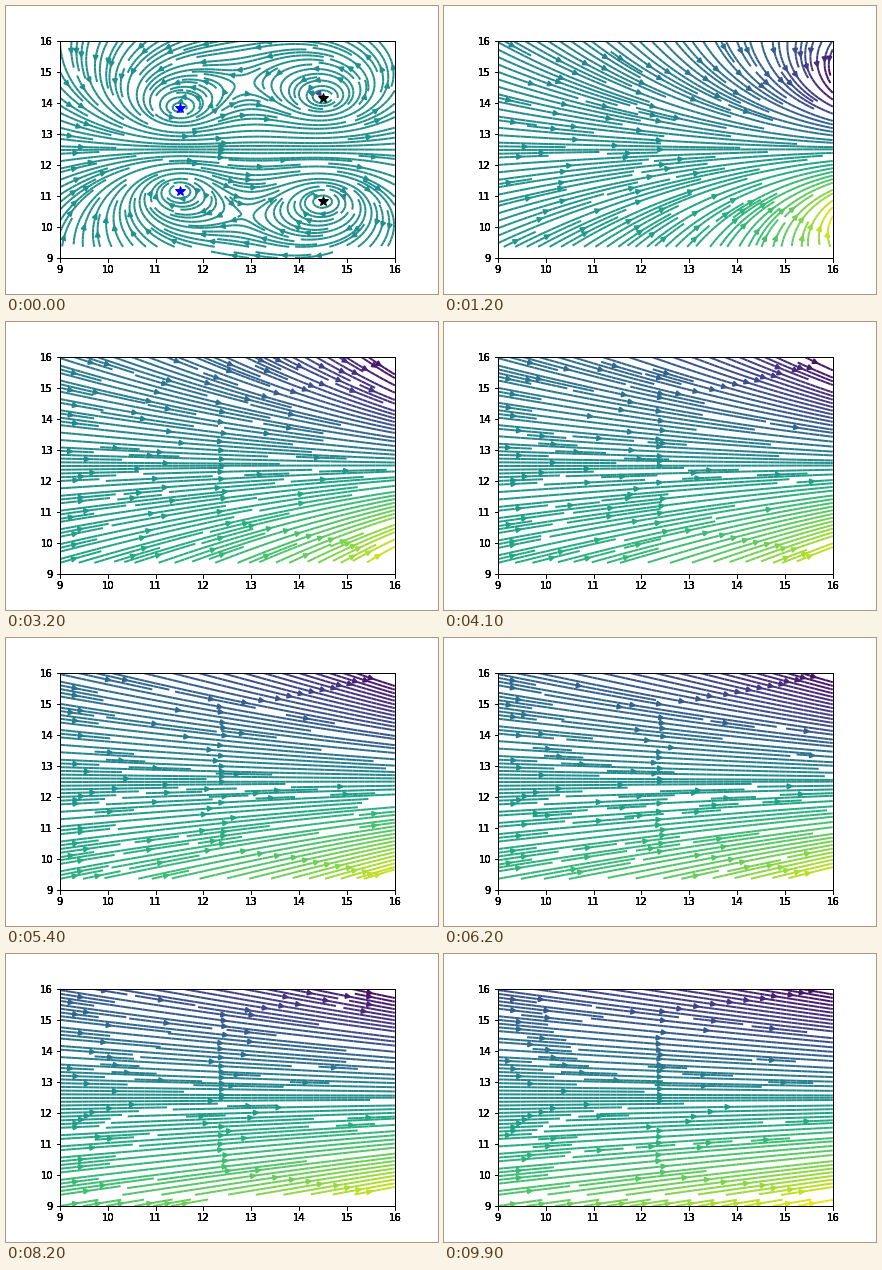
These frames come from a looping animation (432x288 px, 10 s). A matplotlib script:

```python
import numpy as np
import matplotlib.pyplot as plt
from matplotlib.animation import FuncAnimation
from matplotlib.collections import LineCollection, PolyCollection

FRAMES, INTERVAL = 100, 100
LOW, HIGH = 9, 16
SPAN, MID = HIGH - LOW, (LOW + HIGH) / 2
NODES = 100                   # velocity samples per side
EDGE = (NODES - 1) / NODES    # last sample, in units of NODES samples
CELLS = 60                    # occupancy cells per side
MAX_STEP, MAX_ERROR = 1 / CELLS, 0.003
MIN_LENGTH, MAX_LENGTH = 0.1, 2
GAP = 3 / NODES, 5 / NODES    # band without velocity data
LINE_WIDTH = 2
HEAD_LENGTH, HEAD_HALF = 4, 2
LABEL_LAYERS = 5


# Vortex motion: each pair is its upper vortex, x + i * (height above the axis)

def drift(c, other):
    x, h = other.real, other.imag
    w = 1 / (2 * c.imag) + 2 * h / ((c - x) ** 2 + h * h)
    return c + w.conjugate()


def vortex_path(count):
    rear, front = 11 + 1.5j, 14 + 1.5j
    path = []
    for _ in range(count):
        rear, front = drift(rear, front), drift(front, rear)
        path.append((rear, front))
    return path


def make_field(rear, front):
    """Complex velocity u - iv over the square from 0 to EDGE."""
    unit = EDGE / SPAN
    (a, ha), (b, hb) = [((c.real - LOW) * unit + 0.5j * EDGE, c.imag * unit)
                        for c in (rear, front)]
    ha2, hb2 = ha * ha, hb * hb

    def field(p):
        qa, qb = p - a, p - b
        return ha / (qa * qa + ha2) + hb / (qb * qb + hb2)
    return field


# Streamlines with at most one line per cell

def spiral():
    for a in range(CELLS // 2):
        b = CELLS - 1 - a
        yield from ((x, a) for x in range(a, b + 1))
        yield from ((b, y) for y in range(a + 1, b + 1))
        yield from ((x, b) for x in range(b - 1, a - 1, -1))
        yield from ((a, y) for y in range(b - 1, a, -1))


def inside(p):
    return 0 <= p.real <= EDGE and 0 <= p.imag <= EDGE


def blocked(p):
    return GAP[0] <= p.imag < GAP[1]


def to_edge(x, c):
    if c == 0:
        return float("inf")
    return x / -c if c < 0 else (EDGE - x) / c


def march(p, sign, cell, field, used, trail):
    """Heun steps with error control, until an edge or a used cell."""
    points, total, ds = [], 0.0, MAX_STEP
    while True:
        out = not inside(p)
        if not out:
            points.append(p)
            if blocked(p):
                break
            w = field(p)
            k1 = sign * w.conjugate() / abs(w)
            q = p + ds * k1
            out = not inside(q)
        if out:
            p = points[-1]
            ds = min(to_edge(p.real, k1.real), to_edge(p.imag, k1.imag))
            points.append(p + ds * k1)
            total += ds
            break
        if blocked(q):
            break
        w = field(q)
        k2 = sign * w.conjugate() / abs(w)
        error = abs(k2 - k1) * ds / 2
        if error < MAX_ERROR:
            p += ds * (k1 + k2) / 2
            here = (int(p.real * (CELLS - 1) + 0.5),
                    int(p.imag * (CELLS - 1) + 0.5))
            if here != cell:
                if here in used:
                    break
                used.add(here)
                trail.append(here)
                cell = here
            if total + ds > MAX_LENGTH:
                break
            total += ds
        ds = min(MAX_STEP, 0.85 * ds * (MAX_ERROR / error) ** 0.5) if error else MAX_STEP
    return total, points


def streamlines(field):
    used, lines = set(), []
    for cell in SEEDS:
        start = complex(*cell) / (CELLS - 1)
        if cell in used or not inside(start):
            continue
        used.add(cell)
        trail = [cell]
        s_back, back = march(start, -1, cell, field, used, trail)
        s_fore, fore = march(start, 1, cell, field, used, trail)
        if s_back + s_fore > MIN_LENGTH:
            lines.append(np.array(back[::-1] + fore[1:]))
        else:
            used.difference_update(trail)
    return lines


def as_xy(p):
    return np.stack([p.real, p.imag], axis=-1) / EDGE


def arrow_heads(tails, tips):
    """Triangles in pixels, set back so the stroke ends near the tip."""
    tail, tip = (ax.transAxes.transform(as_xy(p)) for p in (tails, tips))
    d = tip - tail
    d /= np.hypot(d[:, :1], d[:, 1:])
    side = np.stack([-d[:, 1], d[:, 0]], axis=1) * HEAD_HALF
    sine = HEAD_HALF / np.hypot(HEAD_LENGTH, HEAD_HALF)
    point = tip - d * LINE_WIDTH / 2 / sine
    base = point - d * HEAD_LENGTH
    return np.stack([base + side, point, base - side], axis=1)


SEEDS = list(spiral())
PATH = vortex_path(FRAMES)
axis = np.linspace(0, EDGE, NODES)
GRID = axis + 1j * axis[:, None]

fig = plt.figure(figsize=(6, 4), dpi=72, facecolor="white")
fig.subplots_adjust(left=0.125, right=0.9, bottom=0.125, top=0.88)
ax = fig.add_subplot()
# Stacked frames give the heavy labels
layers = [ax] + [fig.add_axes(ax.get_position(), facecolor="none", label=f"layer {i}")
                 for i in range(1, LABEL_LAYERS)]
for layer in layers:
    layer.set(xlim=(LOW, HIGH), ylim=(LOW, HIGH),
              xticks=range(LOW, HIGH + 1), yticks=range(LOW, HIGH + 1))

stream = LineCollection([], linewidths=LINE_WIDTH, cmap="viridis",
                        transform=ax.transAxes, zorder=2)
heads = PolyCollection([], linewidths=LINE_WIDTH, cmap="viridis", edgecolors="face",
                       joinstyle="round", transform=None, zorder=2)
for artist in (stream, heads):
    ax.add_collection(artist, autolim=False)
stars = [ax.plot([], [], "*", color=c, markersize=10, zorder=3)[0]
         for c in ("blue", "black")]


def update(i):
    field = make_field(*PATH[i])
    lines = streamlines(field)

    segments = [np.stack([as_xy(p[:-1]), as_xy(p[1:])], axis=1) for p in lines]
    starts = np.concatenate([p[:-1] for p in lines])
    tails, tips = [], []
    for p in lines:
        s = np.cumsum(np.abs(np.diff(p)))
        n = np.searchsorted(s, s[-1] / 2)
        tails.append(p[n])
        tips.append((p[n] + p[n + 1]) / 2)
    tails, tips = np.array(tails), np.array(tips)

    rise = -field(GRID).imag
    stream.set_segments(np.concatenate(segments))
    stream.set_array(-field(starts).imag)
    heads.set_verts(arrow_heads(tails, tips))
    heads.set_array(-field(tails).imag)
    for artist in (stream, heads):
        artist.set_clim(rise.min(), rise.max())
    for star, c in zip(stars, PATH[i]):
        star.set_data([c.real] * 2, [MID + c.imag, MID - c.imag])
    return [stream, heads, *stars]


anim = FuncAnimation(fig, update, frames=FRAMES, interval=INTERVAL,
                     repeat=True, repeat_delay=0)
plt.show()
```
